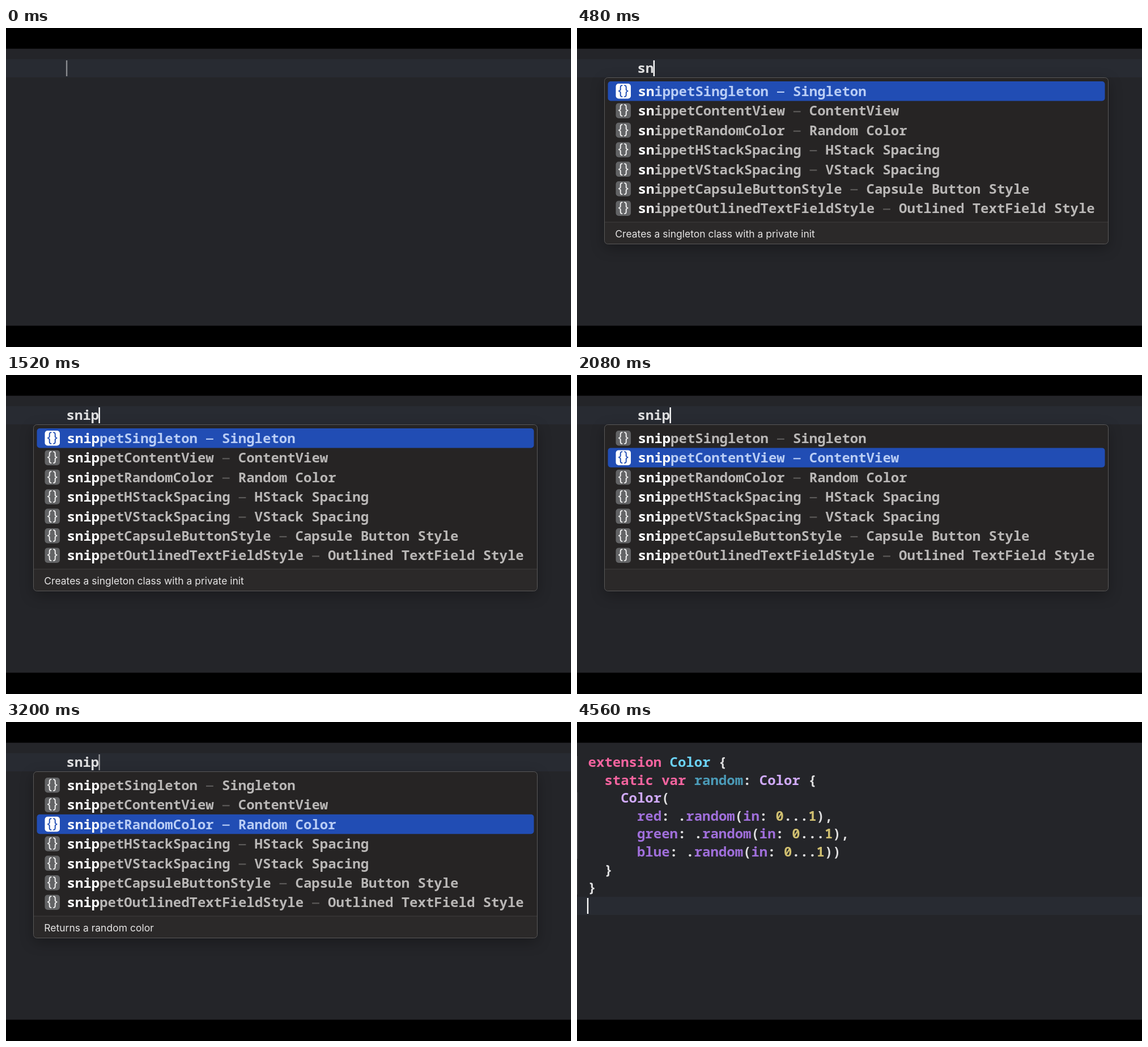
Animation, 997 px wide and 562 px high, one loop 4640 ms. Source, as an HTML page with a canvas:

```html
<!DOCTYPE html>
<html lang="en">
<head>
<meta charset="utf-8">
<title>Code snippets</title>
<style>
html, body { margin: 0; width: 100%; height: 100%; overflow: hidden; background: #000; }
canvas { display: block; }
</style>
</head>
<body>
<canvas id="stage" width="997" height="562"></canvas>
<script>
const ctx = document.getElementById('stage').getContext('2d');
const LOOP = 4640, STEP = 80, CH = 14.39, ROW = 34.4, LINE = 31.6;
const MONO = '24px "Noto Sans Mono", "DejaVu Sans Mono", monospace';
const SANS = '17.5px Inter, "Liberation Sans", sans-serif';
const BRACES = '24px Inter, "Liberation Sans", sans-serif';

const items = [
  ['snippetSingleton', 'Singleton', 'Creates a singleton class with a private init'],
  ['snippetContentView', 'ContentView', ''],
  ['snippetRandomColor', 'Random Color', 'Returns a random color'],
  ['snippetHStackSpacing', 'HStack Spacing', ''],
  ['snippetVStackSpacing', 'VStack Spacing', ''],
  ['snippetCapsuleButtonStyle', 'Capsule Button Style', ''],
  ['snippetOutlinedTextFieldStyle', 'Outlined TextField Style', '']
];

// Each run of code starts with a one-letter style key.
const styles = {
  k: ['#f5649f', 700], d: ['#6bd2f4', 600], v: ['#4b9bb8', 600], t: ['#d0aaf9', 600],
  m: ['#a06fdb', 600], n: ['#d0bf70', 600], p: ['#dfdfe0', 600]
};
const channel = (name, end) =>
  ['p      ', 'm' + name, 'p: .', 'mrandom', 'p(', 'min', 'p: ', 'n0', 'p...', 'n1', 'p' + end];
const code = [
  ['kextension ', 'dColor', 'p {'],
  ['p  ', 'kstatic var ', 'vrandom', 'p: ', 'tColor', 'p {'],
  ['p    ', 'tColor', 'p('],
  channel('red', '),'),
  channel('green', '),'),
  channel('blue', '))'),
  ['p  }'],
  ['p}']
];

const typing = [[320, 1], [480, 2], [640, 3], [720, 4]];
const POPUP = 400, SECOND = 2000, THIRD = 2640, INSERT = 3520;
// Caret opacity as [time, value] points, linear in between.
const caretKeys = [
  [0, .45], [160, 1], [1560, 1], [1720, 0], [1920, 0], [2040, 1], [2640, 1], [2800, 0],
  [3120, 0], [3280, 1], [4080, 1], [4240, 0], [4400, 0], [4560, 1], [4640, 1]
];

function rect(x, y, w, h, color) {
  ctx.fillStyle = color;
  ctx.fillRect(x, y, w, h);
}

function round(x, y, w, h, r, color) {
  ctx.fillStyle = color;
  ctx.beginPath();
  ctx.roundRect(x, y, w, h, r);
  ctx.fill();
}

function text(str, x, y, color, weight = 600, font = MONO) {
  ctx.font = weight + ' ' + font;
  ctx.fillStyle = color;
  ctx.fillText(str, x, y);
}

function caretAlpha(t) {
  const i = caretKeys.findIndex(key => key[0] > t);
  const [t0, a] = caretKeys[i - 1], [t1, b] = caretKeys[i];
  return a + (b - a) * (t - t0) / (t1 - t0);
}

function caret(x, y, t) {
  rect(x, y, 2.4, 28, `rgba(255,255,255,${caretAlpha(t)})`);
}

function drawItem(i, chosen, typed) {
  const [name, title] = items[i], y = 94 + i * ROW;
  const color = chosen ? '#b9cdf5' : '#b9b7b6';
  if (chosen) round(54.5, y, 877, ROW, 5, '#214db4');
  round(68.5, y + 4, 26.5, 26.5, 5, chosen ? '#fff' : '#636466');
  ctx.textAlign = 'center';
  text('{}', 81.7, y + 25, chosen ? '#214db4' : '#f2f2f2', 400, BRACES);
  ctx.textAlign = 'left';

  const base = y + 26, at = col => 107.6 + col * CH;
  text(name.slice(0, typed), at(0), base, '#fff', 700);
  text(name.slice(typed), at(typed), base, color);
  rect(at(name.length + 1) + .8, base - 8.2, 12.8, 2.2, chosen ? color : '#5c5a59');
  text(title, at(name.length + 3), base, color);
}

function drawPopup(selected, typed) {
  ctx.save();
  ctx.shadowColor = 'rgba(0,0,0,.3)';
  ctx.shadowBlur = 24;
  ctx.shadowOffsetY = 7;
  round(48.5, 87.5, 889, 293, 6, '#262424');
  ctx.restore();
  round(49, 342, 888, 38, [0, 0, 6, 6], '#2b2929');
  rect(49, 341.5, 888, 1, '#403e3e');
  ctx.strokeStyle = '#595858';
  ctx.beginPath();
  ctx.roundRect(48.5, 87.5, 889, 293, 6);
  ctx.stroke();
  items.forEach((_, i) => drawItem(i, i === selected, typed));
  text(items[selected][2], 67.3, 369, '#e6e5e5', 400, SANS);
}

function drawCode(t) {
  rect(0, 308, 997, 32, '#282b32');
  rect(0, 60, 1.3, 244, '#3b3c40');
  rect(0, 124, 1.3, 117, '#4c4d51');
  code.forEach((runs, i) => {
    let col = 0;
    for (const run of runs) {
      const [color, weight] = styles[run[0]], str = run.slice(1);
      text(str, 19.6 + col * CH, 79 + i * LINE, color, weight);
      col += str.length;
    }
  });
  caret(17.8, 310, t);
}

function drawEntry(t) {
  const typed = typing.reduce((n, [at, count]) => t >= at ? count : n, 0);
  rect(0, 55, 997, 32, '#282b32');
  if (t >= POPUP) drawPopup(t < SECOND ? 0 : t < THIRD ? 1 : 2, typed);
  text('snip'.slice(0, typed), 106.6, 79, '#dfdfe0');
  caret(105.9 + typed * CH, 57, t);
}

function draw(t) {
  rect(0, 0, 997, 562, '#000');
  rect(0, 36.5, 997, 488, '#242529');
  if (t < INSERT) drawEntry(t);
  else drawCode(t);
}

const start = performance.now();
function tick() {
  const t = (performance.now() - start) % LOOP;
  draw(Math.floor(t / STEP) * STEP);
  requestAnimationFrame(tick);
}
tick();
</script>
</body>
</html>
```
